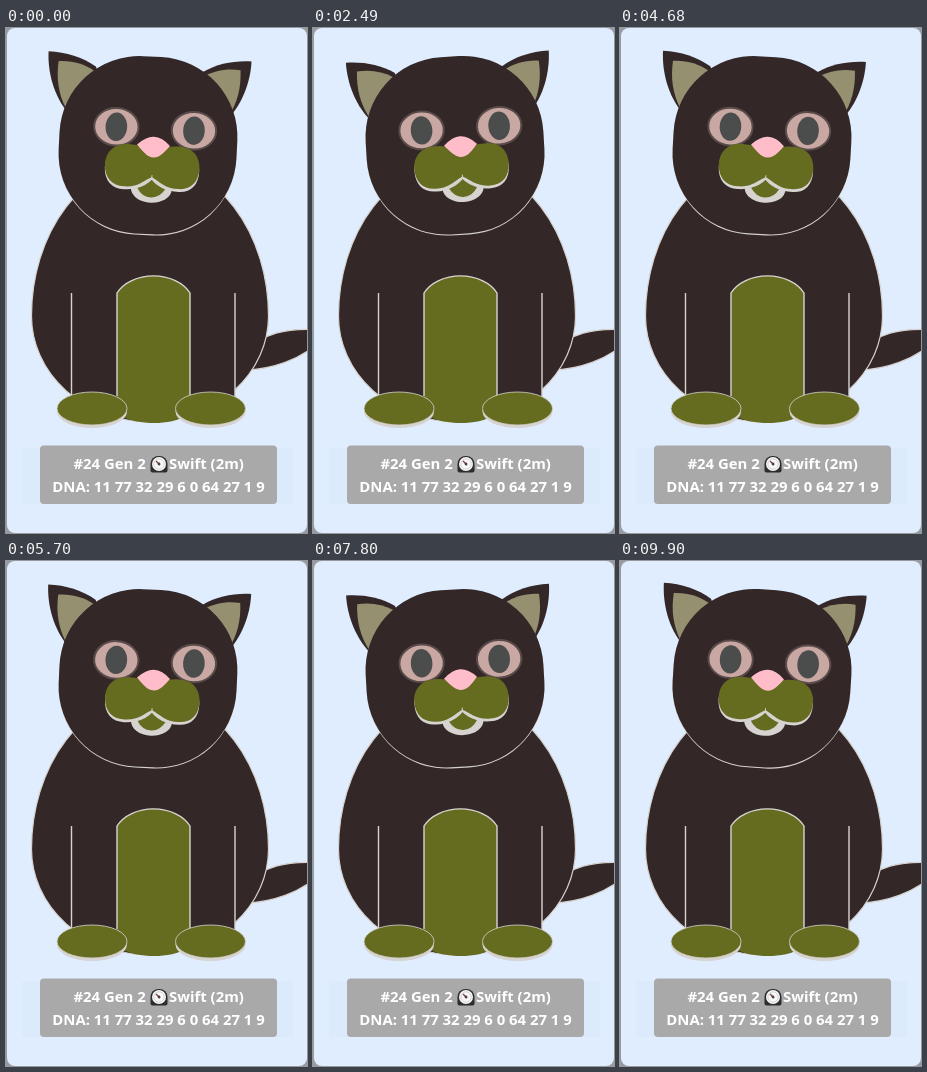
Write an HTML page with a canvas that moves like this. It is 301 px wide and 505 px high and loops after 9.93 s.

```html
<!DOCTYPE html>
<html lang="en">
<head>
<meta charset="utf-8">
<title>Cat</title>
<style>
  html, body { margin: 0; width: 100%; height: 100%; overflow: hidden; background: #dfedff; }
  canvas { display: block; width: 301px; height: 505px; }
</style>
</head>
<body>
<canvas id="stage" width="301" height="505"></canvas>
<script>
const ctx = document.getElementById('stage').getContext('2d');
const LOOP = 9930, STEP = 30;
const SWAY = { period: 4595, peak: 5115, degrees: 3.8, x: 142, y: 117 };
const FUR = '#342727', OLIVE = '#656c20', LIGHT = '#d6d3d0', INNER_EAR = '#949070';

const shapes = {
  body: new Path2D('M25.500 288A118.500 154.500 0 0 1 262.500 288A118.500 106 0 0 1 25.500 288Z'),
  tail: new Path2D('M240 322C259 306 278 300 310 301.500L310 317C291 332 270 340 240 342.500Z'),
  legs: new Path2D('M66 265H111V374H66ZM184 265H229V374H184Z'),
  legEdges: new Path2D('M65.500 265V370M229 265V370'),
  belly: new Path2D('M111 265A40 29 0 0 1 184 265L184 386C172 393 160 395 148 395C136 395 123 393 111 386Z'),
  bellyEdge: new Path2D('M111 368V265A40 29 0 0 1 184 265V368'),
  ear: new Path2D('M0 0C18 0 34 4 48 13L70 60L24 62C7 45 0 20 0 0Z'),
  innerEar: new Path2D('M10.500 9.500C24 8 36 11 46 17L60 50L30 62L20 56C12 42 9 27 10.500 9.500Z'),
  nose: new Path2D('M131 117Q140 108.500 147.500 108.500Q156 108.500 164 117Q157 126 153 128Q148 130.500 143 128Q139 126 131 117Z'),
  muzzle: new Path2D('M147.500 126Q140 117 122 117C108 117 100 126 100 138C100 152 108 159.500 120 159.500' +
    'C134 160 139 153 147.500 149C156 153 161 160 175 159.500C187 159.500 194.500 152 194.500 138C194.500 126 187 117 173 117Q155 117 147.500 126Z'),
  chin: new Path2D('M132.500 160Q142 157 147.500 150.500Q153 157 162.500 160Q157 170 147.500 170Q138 170 132.500 160Z'),
  head: new Path2D()
};
shapes.head.roundRect(53, 28.5, 178, 177.5, 80);

function fill(path, color, dx = 0, dy = 0, flip = 1) {
  ctx.save();
  ctx.translate(dx, dy);
  ctx.scale(flip, 1);
  ctx.fillStyle = color;
  ctx.fill(path);
  ctx.restore();
}

function stroke(path, width = 1.2, color = LIGHT) {
  ctx.strokeStyle = color;
  ctx.lineWidth = width;
  ctx.stroke(path);
}

function ellipse(x, y, rx, ry) {
  const path = new Path2D();
  path.ellipse(x, y, rx, ry, 0, 0, Math.PI * 2);
  return path;
}

function box(x, y, w, h, radius, color) {
  const path = new Path2D();
  path.roundRect(x, y, w, h, radius);
  fill(path, color);
}

function drawCard() {
  ctx.fillStyle = '#989ca2';
  ctx.fillRect(0, 0, 301, 505);
  box(1, 0, 300, 505, 8, '#dfedff');
  box(16, 420, 271, 56, 0, '#dbebfb');
}

function drawBody() {
  fill(shapes.tail, FUR);
  stroke(shapes.tail);
  fill(shapes.body, FUR);
  stroke(shapes.body);
  fill(shapes.legs, FUR);
  fill(shapes.belly, OLIVE);
  stroke(shapes.bellyEdge, 1.4);
  stroke(shapes.legEdges, 1.4);
  for (const x of [86, 204.5]) {
    fill(ellipse(x, 383.5, 35, 16.5), LIGHT);
    const paw = ellipse(x, 380.5, 35, 16.5);
    fill(paw, OLIVE);
    stroke(paw, 0.8);
  }
}

function drawEye(x) {
  const eye = ellipse(x, 100.4, 22.2, 18.8);
  fill(eye, '#c9a8a3');
  stroke(eye, 2, '#584b49');
  fill(ellipse(x, 100.4, 10.8, 14.2), '#4b4c4c');
}

function drawHead(angle) {
  ctx.save();
  ctx.translate(SWAY.x, SWAY.y);
  ctx.rotate(angle);
  ctx.translate(-SWAY.x, -SWAY.y);

  for (const [x, flip] of [[38, 1], [241.2, -1]]) {
    fill(shapes.ear, FUR, x, 28.3, flip);
    fill(shapes.innerEar, INNER_EAR, x, 28.3, flip);
  }
  fill(shapes.head, LIGHT, 0, 1.1);
  fill(shapes.head, FUR);
  drawEye(109.5);
  drawEye(187.2);

  fill(ellipse(147.5, 160.5, 20.5, 14), LIGHT);
  fill(shapes.muzzle, LIGHT, 0, 2.8);
  fill(shapes.muzzle, OLIVE);
  fill(shapes.chin, OLIVE);
  stroke(shapes.chin, 1.4);
  stroke(new Path2D('M147.500 147V151'), 1);
  fill(shapes.nose, '#ffbdc9');
  ctx.restore();
}

function drawTimer(x, y) {
  box(x - 8.5, y - 8, 17, 16.5, [8, 8, 2, 2], '#2d2d2d');
  fill(ellipse(x, y, 7, 7), '#f8f8f8');
  stroke(ellipse(x, y, 5.2, 5.2), 0.7, '#c4c4c4');
  stroke(new Path2D(`M${x - 3} ${y - 3}L${x + 1} ${y + 1}`), 1.2, '#8a3a34');
  fill(ellipse(x, y, 1.4, 1.4), '#444');
}

function drawLabel() {
  box(34, 417.5, 237, 58.5, 4, '#a9a9a9');
  ctx.fillStyle = '#fff';
  ctx.font = 'bold 14.9px "Open Sans", "Noto Sans", sans-serif';
  ctx.textAlign = 'left';
  ctx.fillText('#24 Gen 2', 67.5, 441);
  ctx.fillText('Swift (2m)', 163, 441);
  ctx.textAlign = 'center';
  ctx.fillText('DNA: 11 77 32 29 6 0 64 27 1 9', 152.5, 464);
  drawTimer(153, 436);
}

function draw(time) {
  const t = Math.floor((time % LOOP) / STEP) * STEP;
  const phase = 2 * Math.PI * (t - SWAY.peak) / SWAY.period;
  drawCard();
  drawBody();
  drawHead(SWAY.degrees * Math.PI / 180 * Math.cos(phase));
  drawLabel();
}

const start = performance.now();
function tick() {
  draw(performance.now() - start);
  requestAnimationFrame(tick);
}
tick();
</script>
</body>
</html>
```
